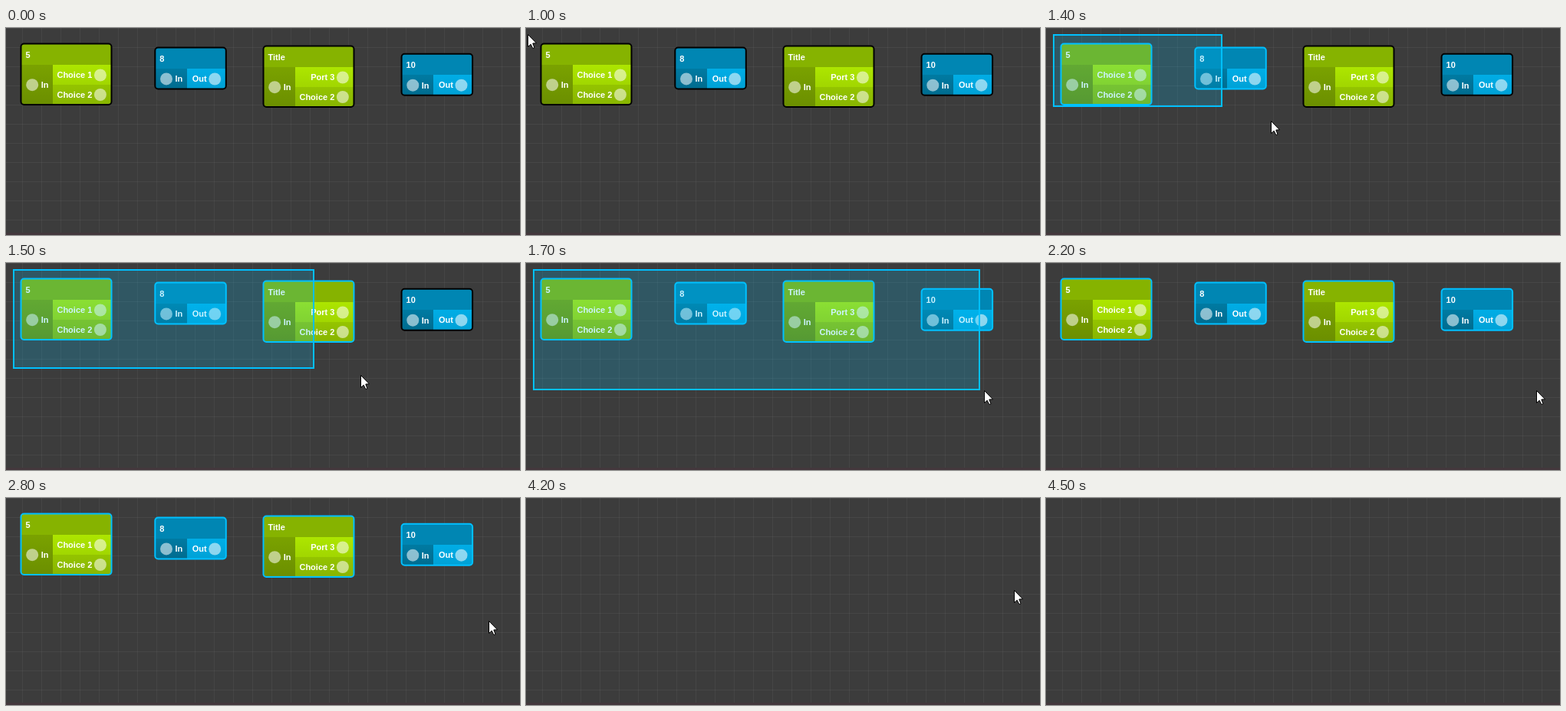
Animation, 670 px wide and 270 px high, one loop 5400 ms. Source, as an HTML page with a canvas:

```html
<!DOCTYPE html>
<html lang="en">
<head>
<meta charset="utf-8">
<title>Node selection</title>
<style>
html, body { margin: 0; width: 100%; height: 100%; overflow: hidden; background: #3c3c3c; }
canvas { display: block; }
</style>
</head>
<body>
<canvas id="stage" width="670" height="270"></canvas>
<script>
const ctx = document.getElementById('stage').getContext('2d');
const W = 670, H = 270, LOOP = 5400, TICK = 100;
const ACCENT = 'rgb(0,192,255)';
const ENTER = 100, SELECT_START = 1300, SELECT_END = 2200, DELETE_AT = 4200, LEAVE = 4500;
const BOX_LAG = 40;

const GREEN = [192, 255, 0], BLUE = [0, 192, 255];
const nodes = [
  { x: 18.5, y: 19.5, w: 120, title: '5', outs: ['Choice 1', 'Choice 2'], color: GREEN },
  { x: 193.3, y: 24.5, w: 94.5, title: '8', outs: ['Out'], color: BLUE },
  { x: 334.5, y: 22.5, w: 120, title: 'Title', outs: ['Port 3', 'Choice 2'], color: GREEN },
  { x: 514.6, y: 32.7, w: 94.5, title: '10', outs: ['Out'], color: BLUE }
];

// Pointer stops: time, x, y, ease-out power
const stops = [
  [100, 510, 5], [300, 235, 40], [600, 42, 18, 2], [1000, 2, 8, 2], [1200, 9, 9],
  [1360, 230, 102], [1400, 293, 121], [1700, 597, 166, 2], [2000, 639, 166, 2],
  [2400, 639, 166], [2600, 630, 161], [2800, 629, 160], [4100, 629, 160], [4400, 651, 40]
];

function pointerAt(t) {
  const i = stops.findIndex(s => s[0] >= t);
  if (i < 1) return stops.at(i).slice(1, 3);
  const [t0, x0, y0] = stops[i - 1];
  const [t1, x1, y1, power = 1] = stops[i];
  const k = 1 - (1 - (t - t0) / (t1 - t0)) ** power;
  return [Math.round(x0 + (x1 - x0) * k), Math.round(y0 + (y1 - y0) * k)];
}

const shade = (color, k) => `rgb(${color.map(c => Math.round(c * k))})`;

function rect(x, y, w, h, fill) {
  ctx.fillStyle = fill;
  ctx.fillRect(x, y, w, h);
}

function fade(x, y, w, h, color, from, to) {
  const g = ctx.createLinearGradient(0, y, 0, y + h);
  g.addColorStop(0, shade(color, from));
  g.addColorStop(1, shade(color, to));
  rect(x, y, w, h, g);
}

function label(text, x, y, align = 'left') {
  ctx.font = 'bold 11px "Liberation Sans", Arial, sans-serif';
  ctx.textAlign = align;
  ctx.fillStyle = '#fff';
  ctx.fillText(text, x, Math.floor(y));
}

function port(x, y) {
  ctx.fillStyle = 'rgba(255,255,255,0.55)';
  ctx.beginPath();
  ctx.arc(x, y, 8, 0, Math.PI * 2);
  ctx.fill();
}

function drawGrid() {
  rect(0, 0, W, H, '#3c3c3c');
  const line = 'rgba(255,255,255,0.05)';
  for (let x = 21; x < W; x += 25) rect(x, 0, 1, H, line);
  for (let y = 0; y < H; y += 25) rect(0, y, W, 1, line);
  rect(0, 267, W, 3, '#43373c');
}

function drawNode({ x, y, w, title, outs, color }, selected) {
  const rowH = 25.5, split = Math.round(x + 42.5), top = Math.round(y + 28.5);
  const h = 30.5 + rowH * outs.length;
  const frame = new Path2D();
  frame.roundRect(x + 1, y + 1, w - 2, h - 2, 4);

  ctx.save();
  ctx.clip(frame);
  rect(x, y, w, h, shade(color, 0.7));
  fade(x, top, w, y + h - top, color, 0.635, 0.555);
  outs.forEach((_, i) => {
    const k = 0.9 - i * 0.13;
    fade(split, top + i * 26, w, 26, color, k, k - 0.06);
  });
  ctx.restore();

  ctx.strokeStyle = selected ? ACCENT : '#000';
  ctx.lineWidth = 2;
  ctx.stroke(frame);

  label(title, x + 7, y + 19.5);
  const mid = y + 29.2 + rowH * outs.length / 2;
  port(x + 15.7, mid);
  label('In', x + 27.2, mid + 4.5);
  outs.forEach((text, i) => {
    const cy = y + 42 + i * rowH;
    port(x + w - 15.6, cy);
    label(text, x + w - 26.2, cy + 4, 'right');
  });
}

function drawBox([px, py]) {
  const right = px, bottom = py + 1;
  rect(9, 8, right - 9, bottom - 8, 'rgba(0,192,255,0.2)');
  ctx.strokeStyle = ACCENT;
  ctx.lineWidth = 2;
  ctx.strokeRect(10, 9, right - 11, bottom - 10);
}

function drawPointer([x, y]) {
  ctx.save();
  ctx.translate(x + 0.5, y + 0.5);
  ctx.beginPath();
  ctx.moveTo(0, 0);
  [[0, 16], [3.7, 12.7], [6.3, 18], [8.5, 17.3], [6.3, 11.5], [11, 11.3]].forEach(p => ctx.lineTo(...p));
  ctx.closePath();
  ctx.fillStyle = '#fff';
  ctx.fill();
  ctx.strokeStyle = '#000';
  ctx.lineWidth = 1;
  ctx.stroke();
  ctx.restore();
}

function draw(time) {
  const t = Math.floor((time % LOOP) / TICK) * TICK;
  const corner = pointerAt(Math.min(t, SELECT_END) - BOX_LAG);
  drawGrid();
  if (t < DELETE_AT) {
    nodes.forEach(n => drawNode(n, t >= SELECT_START && corner[0] > n.x && corner[1] > n.y));
  }
  if (t >= SELECT_START && t < SELECT_END) drawBox(corner);
  if (t >= ENTER && t < LEAVE) drawPointer(pointerAt(t));
}

function loop() {
  draw(performance.now());
  requestAnimationFrame(loop);
}
loop();
</script>
</body>
</html>
```
